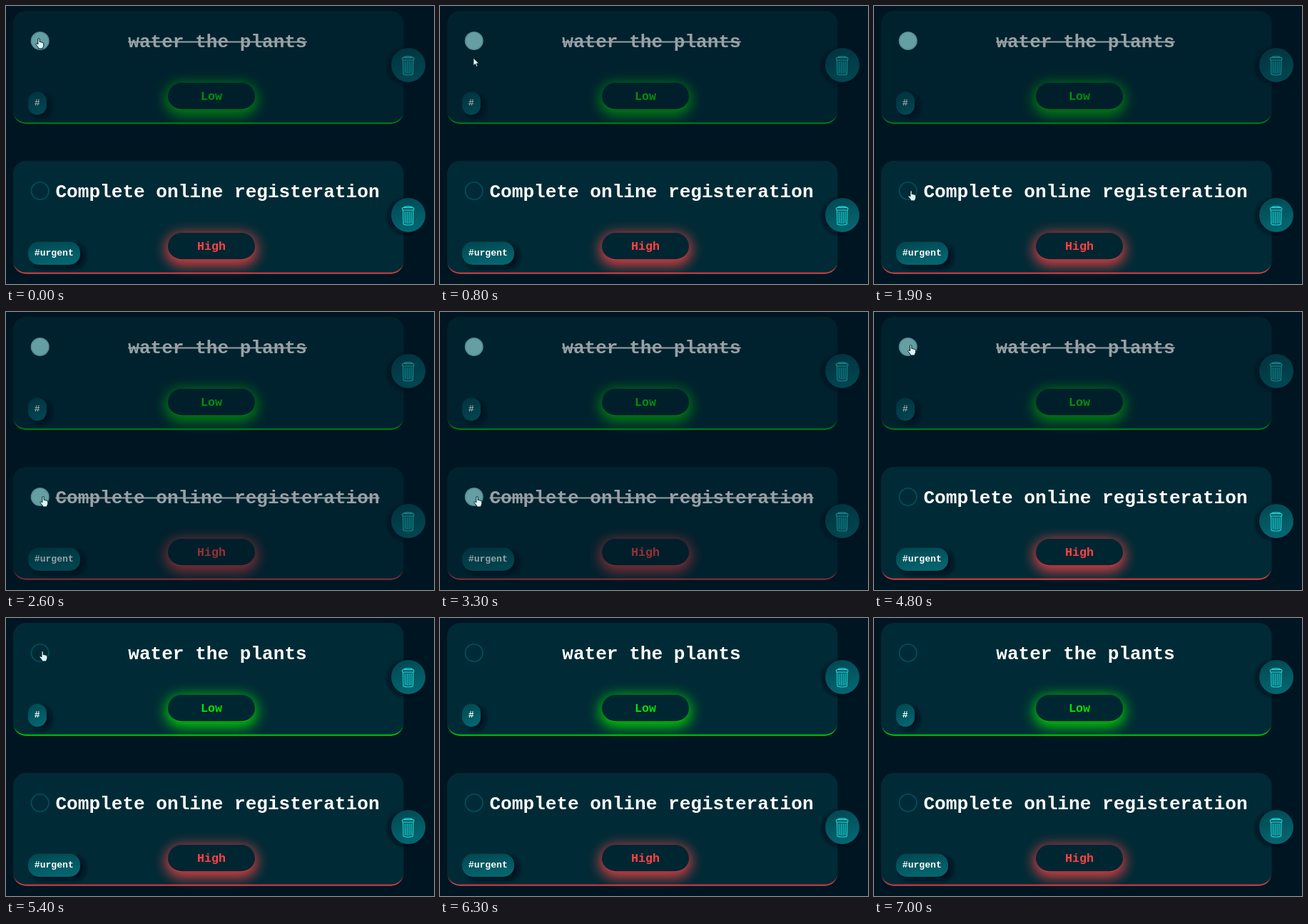
Animation, 600 px wide and 391 px high, one loop 7200 ms. Source, as an HTML page:

```html
<!DOCTYPE html>
<html lang="en">
<head>
<meta charset="utf-8">
<title>Task list</title>
<style>
  html, body { margin: 0; width: 100%; height: 100%; overflow: hidden; background: #001522; }
  svg { display: block; width: 600px; height: 391px; }
  text { font-family: "Courier New", "Liberation Mono", monospace; font-weight: 700; fill: #fff; }
  .title { font-size: 26.1px; text-anchor: middle; }
  .level { font-size: 16.67px; text-anchor: middle; }
  .tag { font-size: 13.1px; }
</style>
</head>
<body>
<svg viewBox="0 0 600 391" xmlns="http://www.w3.org/2000/svg">
  <defs>
    <linearGradient id="teal" x1="0" y1="0" x2="0.35" y2="1">
      <stop offset="0" stop-color="#00454f"/>
      <stop offset="1" stop-color="#04656f"/>
    </linearGradient>
    <filter id="soft" x="-60%" y="-60%" width="220%" height="220%"><feGaussianBlur stdDeviation="3.5"/></filter>
    <filter id="glow" x="-40%" y="-100%" width="180%" height="300%"><feGaussianBlur stdDeviation="9"/></filter>
    <g id="bin" fill="none" stroke="#1fd3d4" stroke-width="1.2" stroke-linejoin="round">
      <rect x="-8.3" y="-11.4" width="16.6" height="3.6" rx="1.8"/>
      <path d="M-6.8-11.4Q-5.5-13.2 0-13.2T6.8-11.4M-7.2-7.8L-6.7 11.4Q-6.5 13 0 13T6.7 11.4L7.2-7.8"/>
      <path d="M-4.3-6L-4.1 10.6M-1.4-6V11M1.4-6V11M4.3-6L4.1 10.6"/>
    </g>
  </defs>
  <rect width="600" height="391" fill="#001522"/>
  <g id="cards"></g>
  <g id="cursor" fill="#d9f7f8" stroke="#00161f" stroke-width="1" stroke-linejoin="round">
    <path id="arrow" d="M0 0V11L2.6 8.6L4.4 12.5L6.3 11.6L4.6 7.9H8Z"/>
    <path id="hand" d="M-1.2.3Q0-1.2 1.2.3V4.6Q2.3 3.8 3.2 5Q4.3 4.4 5.1 5.6Q6.6 5.2 6.8 6.8V9.6Q6.6 11.4 5.6 12.4V14H-.6V12.4L-3.8 8.6Q-4.4 7.2-3.4 6.8Q-2.3 6.4-1.2 8Z"/>
  </g>
</svg>
<script>
  const LOOP = 7200, STEP = 100;
  const $ = id => document.getElementById(id);

  const cards = [
    { dy: 0, title: 'water the plants', level: 'Low', color: '#00e400', tag: '#', tagW: 26,
      done: t => t < 5100 },
    { dy: 211, title: 'Complete online registeration', level: 'High', color: '#ff4343', tag: '#urgent', tagW: 73,
      done: t => t >= 2100 && t < 3500 }
  ];

  // Crescent formed by a bottom border on a rounded box
  function rim(x, bottom, w, r, thick) {
    const y = bottom - r, right = x + w, r2 = r - thick;
    return `M${x} ${y}A${r} ${r} 0 0 0 ${x + r} ${bottom}H${right - r}A${r} ${r} 0 0 0 ${right} ${y}` +
      `A${r} ${r2} 0 0 1 ${right - r} ${bottom - thick}H${x + r}A${r} ${r2} 0 0 1 ${x} ${y}Z`;
  }

  function cardMarkup(c) {
    const half = c.title.length * 26.1 * 0.3;
    return `<g class="card" transform="translate(0 ${c.dy})">
      <rect x="10" y="7" width="547.5" height="158.7" rx="18" fill="#002b36"/>
      <path d="${rim(10, 165.7, 547.5, 18, 2)}" fill="${c.color}" opacity=".84"/>
      <circle class="box" cx="47.7" cy="49" r="12.2" stroke-width="1.6"/>
      <text class="title" x="296.5" y="57.5">${c.title}</text>
      <path class="strike" d="M${296.5 - half} 50.4H${296.5 + half}" stroke="#fff" stroke-width="2"/>
      <rect x="224" y="109" width="128" height="45" rx="22" fill="${c.color}" opacity=".85" filter="url(#glow)"/>
      <rect x="227" y="108" width="122" height="38.5" rx="19" fill="#002632"/>
      <path d="${rim(227, 146.5, 122, 19, 1.3)}" fill="${c.color}" opacity=".85"/>
      <text class="level" x="288" y="132" style="fill:${c.color}">${c.level}</text>
      <rect x="37" y="125" width="${c.tagW}" height="32" rx="13" fill="#00101a" filter="url(#soft)"/>
      <rect x="31" y="120.5" width="${c.tagW}" height="32.5" rx="${c.tagW < 30 ? 13 : 15}" fill="url(#teal)"/>
      <text class="tag" x="39.8" y="140">${c.tag}</text>
      <circle cx="560" cy="85" r="23.5" fill="#00101a" filter="url(#soft)"/>
      <circle cx="564" cy="83" r="24" fill="url(#teal)"/>
      <use href="#bin" x="563.7" y="84"/>
    </g>`;
  }
  $('cards').innerHTML = cards.map(cardMarkup).join('');
  const views = [...document.querySelectorAll('.card')].map((el, i) => ({
    el, done: cards[i].done, box: el.querySelector('.box'), strike: el.querySelector('.strike')
  }));

  // Pointer stops: time, x, y
  const path = [[0, 46, 46], [600, 46, 46], [1500, 52, 260], [3500, 52, 260],
    [4130, 52, 47], [5700, 51, 47], [6200, 62, -20], [LOOP, 62, -20]];

  function pointer(t) {
    const i = path.findIndex(p => p[0] > t);
    const [t0, x0, y0] = path[i - 1], [t1, x1, y1] = path[i];
    const u = (t - t0) / (t1 - t0), k = u * u * (3 - 2 * u);
    return [x0 + (x1 - x0) * k, y0 + (y1 - y0) * k];
  }

  function draw(ms) {
    const t = Math.min(Math.floor(ms % LOOP / STEP) * STEP, 7000);
    for (const v of views) {
      const on = v.done(t);
      v.el.setAttribute('opacity', on ? 0.6 : 1);
      v.box.setAttribute('fill', on ? '#a8fbfa' : 'none');
      v.box.setAttribute('stroke', on ? '#8fe0e2' : '#05505a');
      v.strike.setAttribute('visibility', on ? 'visible' : 'hidden');
    }
    const [x, y] = pointer(t);
    const over = cards.some(c => Math.hypot(x - 47.7, y - 49 - c.dy) < 13);
    $('cursor').setAttribute('transform', `translate(${x} ${y})`);
    $('hand').setAttribute('visibility', over ? 'visible' : 'hidden');
    $('arrow').setAttribute('visibility', over ? 'hidden' : 'visible');
  }

  const start = performance.now();
  function tick() {
    draw(performance.now() - start);
    requestAnimationFrame(tick);
  }
  tick();
</script>
</body>
</html>
```
